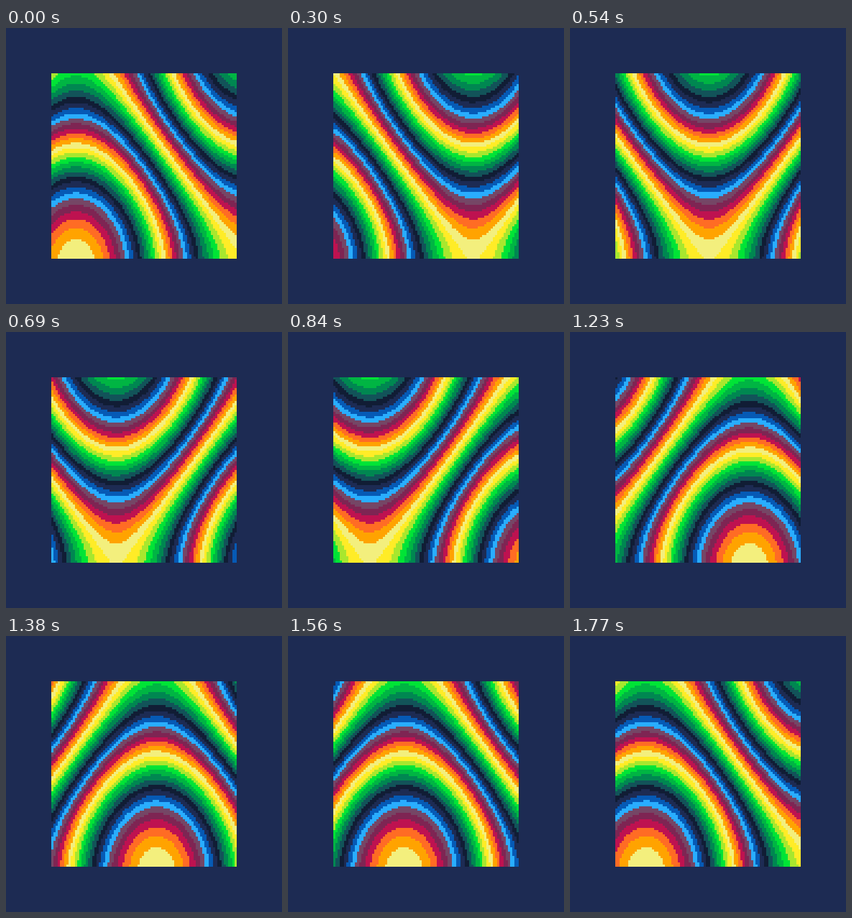
Recreate the animation shown at these times as an HTML page with a canvas. Size 384x384 px, loop 1800 ms.

```html
<!DOCTYPE html>
<html lang="en">
<head>
<meta charset="utf-8">
<title>Plasma</title>
<style>
html, body { margin: 0; width: 100%; height: 100%; overflow: hidden; background: #1d2b53; }
canvas { display: block; width: 384px; height: 384px; }
</style>
</head>
<body>
<canvas id="stage" width="384" height="384"></canvas>
<script>
const ctx = document.getElementById('stage').getContext('2d');
const CELL = 3, FIRST = 21, LAST = 106;
const STEP_MS = 30, STEPS = 60;
const TURN = Math.PI * 2;
const palette = [
  '#f3ef7d', '#ffa300', '#ff6c24', '#be1250',
  '#7e2553', '#754665', '#29adff', '#065ab5',
  '#1d2b53', '#111d35', '#125359', '#008751',
  '#00b543', '#00e436', '#a8e72e', '#ffec27'
];

const wave = turns => 16 * Math.cos(turns * TURN);

function draw(step) {
  const phase = 0.3 + step / STEPS;
  ctx.fillStyle = '#1d2b53';
  ctx.fillRect(0, 0, 384, 384);
  for (let x = FIRST; x <= LAST; x++) {
    const across = wave(x / 160 + phase);
    for (let y = FIRST; y <= LAST; y++) {
      // both waves span the palette twice, so 32 keeps the sum positive
      const level = Math.floor(across + wave(y / 220) + 32 + 1e-9);
      ctx.fillStyle = palette[level % 16];
      ctx.fillRect(x * CELL, y * CELL, CELL, CELL);
    }
  }
}

const start = performance.now();
let shown = -1;

function tick() {
  const elapsed = Math.max(0, performance.now() - start);
  const step = Math.floor(elapsed / STEP_MS) % STEPS;
  if (step !== shown) {
    draw(step);
    shown = step;
  }
  requestAnimationFrame(tick);
}
tick();
</script>
</body>
</html>
```
